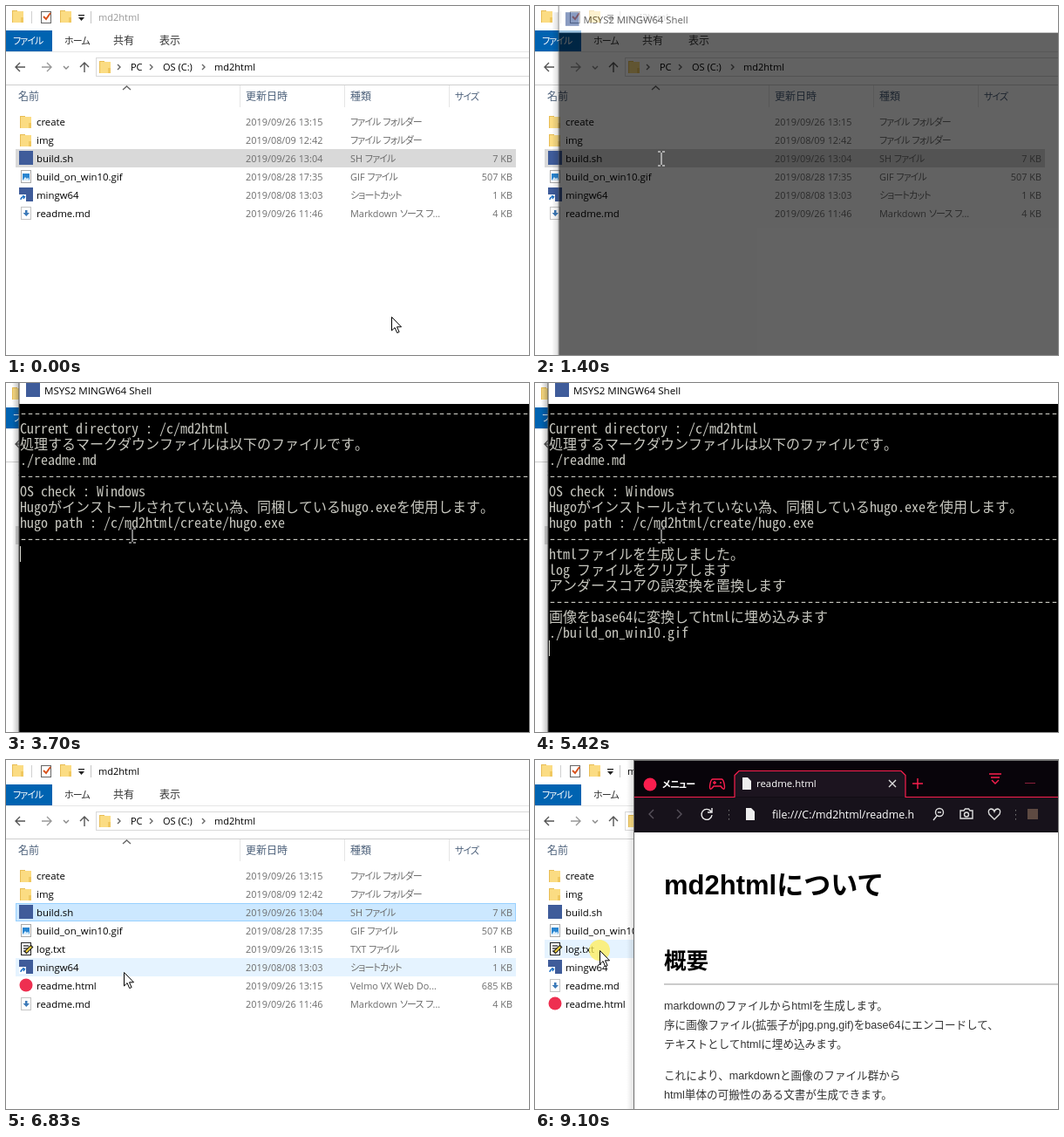
Recreate the animation shown at these times as an HTML page. Size 600x400 px, loop 9170 ms.

```html
<!DOCTYPE html>
<html lang="ja">
<head>
<meta charset="utf-8">
<title>md2html</title>
<style>
html, body { margin: 0; width: 100%; height: 100%; overflow: hidden; background: #fff; }
svg { display: block; width: 600px; height: 400px; }
text { font: 11.4px "Open Sans", "Noto Sans CJK JP", "Noto Sans CJK", sans-serif; white-space: pre; }
.k { font-size: 11px; font-feature-settings: "palt"; letter-spacing: -.9px; }
.nav { font-size: 11px; }
.dim { fill: #6d6d6d; font-size: 10.9px; }
.head { fill: #4c607a; font-size: 12px; }
.menu { fill: #333; font-size: 12px; }
.term text { font: 16px "Noto Sans Mono CJK JP", "Noto Sans Mono", "Noto Sans CJK JP", monospace; fill: #c6c6be; }
.lite { fill: #fff; }
.strong { fill: #fff; font-weight: 600; }
.hint { fill: #e2dee2; font-size: 12px; font-feature-settings: "palt"; }
.hint .k { letter-spacing: -.7px; }
.logo { font-size: 20px; font-weight: 700; font-style: italic; fill: #fff; }
.cat { font-size: 12.5px; font-weight: 600; fill: #f2eef0; }
.game { font-size: 11.2px; font-weight: 700; fill: #fff; letter-spacing: -.2px; }
.day { font-size: 23px; font-weight: 700; fill: #fff; }
.doc text { font: 12.6px "Liberation Sans", "Noto Sans CJK JP", "Noto Sans CJK", sans-serif; fill: #333; }
.doc .k { font: inherit; letter-spacing: 0; font-feature-settings: normal; }
.doc .h1 { font-size: 31px; font-weight: 700; fill: #000; }
.doc .h2 { font-size: 25.5px; font-weight: 700; fill: #000; }
.line { fill: none; stroke-width: 1.4; }
</style>
</head>
<body>
<svg id="stage" viewBox="0 0 600 400"></svg>
<script>
const LOOP = 9170, RED = '#fa1e4e';

// ---- drawing helpers ----
const text = (x, y, s, cls = '', more = '') =>
  `<text x="${x}" y="${y}" class="${cls}" ${more}>${s.replace(/[ァ-ヶー]+/g, '<tspan class="k">$&</tspan>')}</text>`;
const rect = (x, y, w, h, fill, more = '') =>
  `<rect x="${x}" y="${y}" width="${w}" height="${h}" fill="${fill}" ${more}/>`;
const line = (d, color, more = '') => `<path class="line" d="${d}" stroke="${color}" ${more}/>`;
const disc = (x, y, r, fill, more = '') => `<circle cx="${x}" cy="${y}" r="${r}" fill="${fill}" ${more}/>`;
const group = (id, body, more = '') => `<g id="${id}" ${more}>${body}</g>`;
const at = (x, y, body) => `<g transform="translate(${x} ${y})">${body}</g>`;
const dots = (x, color) => [57, 62, 67].map(y => rect(x, y, 1, 1.5, color)).join('');

const page = (edge = '#a9a9a9') => rect(1.5, .5, 11, 14, '#fff', `stroke="${edge}"`);
const icons = {
  folder: rect(0, 1, 6, 14, '#e8bd55') + rect(1, 2, 12, 13, '#fbdc83') + rect(10, 9, 3, 6, '#f0c860'),
  shell: rect(-1, -1, 16, 16, '#3f5c9a'),
  link: rect(-1, -1, 16, 16, '#3f5c9a') + rect(-1, 7, 8, 8, '#fff') + line('M1 13q0-3 4-3.500M3 8.500l2.500 1-1.500 2.500', '#1c6fc4'),
  image: page() + rect(3, 4, 8, 8, '#2a86d1') + '<path d="M3 12l3-4 2 2 1.500-1.500L11 12z" fill="#d6ecfb"/>',
  log: page('#222') + line('M4 4h6M4 7h6M4 10h4', '#444') + line('M6 12L14 4', '#222', 'style="stroke-width:4"') + line('M7 11l6-6', '#f3cf3a', 'style="stroke-width:2.200"'),
  html: disc(7, 7, 7.5, '#ee2f50'),
  md: page('#c4c4c4') + '<path d="M6 4h2.500v3h2.500l-3.700 4-3.700-4H6z" fill="#3b79b8"/>'
};
const icon = (name, x, y) => at(x, y, icons[name]);

// ---- file manager ----
const rowTop = i => 122 + 21 * i;
const dir = 'ファイル フォルダー', day = '2019/09/26 ';
const files = {
  create: ['folder', day + '13:15', dir, ''],
  img: ['folder', '2019/08/09 12:42', dir, ''],
  'build.sh': ['shell', day + '13:04', 'SH ファイル', '7 KB'],
  'build_on_win10.gif': ['image', '2019/08/28 17:35', 'GIF ファイル', '507 KB'],
  'log.txt': ['log', day + '13:15', 'TXT ファイル', '1 KB'],
  mingw64: ['link', '2019/08/08 13:03', 'ショートカット', '1 KB'],
  'readme.html': ['html', day + '13:15', 'Velmo VX Web Do...', '685 KB'],
  'readme.md': ['md', day + '11:46', 'Markdown ソース フ...', '4 KB']
};
const names = Object.keys(files);
const list = (id, order) => group(id, order.map((name, i) => {
  const [pic, date, type, size] = files[name], y = rowTop(i) + 15;
  return icon(pic, 16, rowTop(i) + 3) + text(35, y, name) + text(275, y, date, 'dim') +
    text(395, y, type, 'dim') + text(581, y, size, 'dim', 'text-anchor="end"');
}).join(''));

const chevron = (x, y) => line(`M${x - 2} ${y - 3}l3 3-3 3`, '#666');
const arrow = (x, color) => line(`M${x + 12} 70H${x + 1}M${x + 6} 65l-5 5 5 5`, color);

const explorer = rect(0, 0, 600, 400, '#fff') +
  icon('folder', 7, 4) + rect(29, 6, 1, 14, '#d0d0d0') +
  rect(40.5, 6.5, 11, 13, '#fff', 'stroke="#666"') + line('M43 12l3 3 5-7', '#d9531e', 'style="stroke-width:2"') +
  icon('folder', 62, 4) + rect(83, 10, 7, 1.3, '#222') + '<path d="M83 13h7l-3.500 4z" fill="#222"/>' +
  rect(97, 6, 1, 14, '#c4c4c4') + text(106, 17, 'md2html', 'nav', 'id="caption"') +
  rect(0, 28, 53, 24, '#0063b1') + text(8, 44, 'ファイル', 'lite') +
  text(67, 44, 'ホーム', 'menu') + text(123, 44, '共有', 'menu') + text(176, 44, '表示', 'menu') +
  rect(0, 52, 600, 1, '#e6e6e6') +
  arrow(10, '#555') + `<g transform="matrix(-1 0 0 1 93 0)">${arrow(40, '#999')}</g>` +
  line('M66 69l3 3 3-3', '#888') + line('M90 76V65M85 70l5-5 5 5', '#555') +
  rect(103.5, 59.5, 520, 21, '#fff', 'stroke="#d9d9d9"') + icon('folder', 107, 62) +
  chevron(130, 70) + text(143, 74, 'PC', 'nav') + chevron(167, 70) + text(180, 74, 'OS (C:)', 'nav') +
  chevron(227, 70) + text(239, 74, 'md2html', 'nav') +
  rect(0, 90, 600, 1, '#cfcfcf') + line('M134 96l4.500-4 4.500 4', '#666') +
  [268, 388, 508].map(x => rect(x, 91, 1, 25, '#e5e5e5')).join('') +
  text(14, 108, '名前', 'head') + text(275, 108, '更新日時', 'head') + text(395, 108, '種類', 'head') + text(515, 108, 'サイズ', 'head') +
  '<rect id="hover" x="11" width="574" height="21" fill="#e5f3ff"/>' +
  '<rect id="pick" x="11.500" width="573" height="20"/>' +
  list('before', names.filter(n => !/log|html/.test(n))) +
  list('after', names) +
  list('sorted', [...names.slice(0, 6), 'readme.md', 'readme.html']);

// ---- terminal ----
const rule = '-'.repeat(80);
const output = [
  rule, 'Current directory : /c/md2html', '処理するマークダウンファイルは以下のファイルです。', './readme.md',
  rule, 'OS check : Windows', 'Hugoがインストールされていない為、同梱しているhugo.exeを使用します。',
  'hugo path : /c/md2html/create/hugo.exe',
  rule, 'htmlファイルを生成しました。', 'log ファイルをクリアします', 'アンダースコアの誤変換を置換します',
  rule, '画像をbase64に変換してhtmlに埋め込みます', './build_on_win10.gif',
  rule, 'マークダウンからhtmlファイルの生成処理が完了しました。', '終了します。'
];
// Half-width glyphs take one 8px cell, full-width glyphs two.
const cells = s => {
  let x = 16;
  return [...s].map(c => { const here = x; x += c > 'ÿ' ? 16 : 8; return here; }).join(' ');
};
const terminal = rect(7, 0, 8, 600, 'url(#shade)') +
  rect(15, -30, 900, 630, '#000') + rect(15, -30, 900, 54, '#fff') + rect(14.5, -30, 1, 630, '#555') +
  rect(23, 0, 16, 16, '#3f5c9a') + text(44, 13, 'MSYS2 MINGW64 Shell', '', 'id="title" style="font-size:11.6px"') +
  group('screen', output.map((s, i) => `<text x="${cells(s)}" y="${40 + 18 * i}">${s}</text>`).join(''), 'class="term"') +
  '<rect id="caret" x="16" width="1" height="18" fill="#d8d8d0"/>';

// ---- browser ----
const pad = line('M204 22h10q2 0 3 5t0 6q-1 1-4-3h-8q-3 4-4 3t0-6 3-5z', RED) +
  line('M204 26h4M206 24v4M212 26h2', RED);
const plus = x => line(`M${x - 6} 27h12M${x} 21v12`, RED);
const camera = x => line(`M${x - 7} 58h4l1.500-2h4l1.500 2h3v9h-14z`, '#ddd') + `<circle class="line" cx="${x}" cy="62.500" r="2.500" stroke="#ddd"/>`;
const sheet = (x, y) => `<path d="M${x - 5} ${y - 7}h6l4 4v10h-10z" fill="#eee"/>`;
// Tab outline that runs along the whole bar.
const tab = (left, width, fill) => line(
  `M114 42.500H${left}V17.500l5-5h${width - 10}l5 5v25H600`, RED, `style="fill:${fill};stroke-width:1.200"`);
const chrome = rect(105, 0, 9, 400, 'url(#shade)', 'id="glow"') +
  rect(113, 0, 487, 400, '#707070') + rect(114, 1, 486, 42, '#08040a') + rect(114, 43, 486, 40, '#17121b') +
  disc(132, 28, 7.5, RED) + text(146, 32, 'メニュー', 'strong') +
  line('M521 16h14M523 20h10M524 23l4 4 4-4', RED) + rect(562, 26, 12, 1, '#8a1f3a') +
  line('M136 57l-5 5 5 5M163 57l5 5-5 5', '#57515b') +
  line('M202 59a6 6 0 1 0 1 4M203 55v5h-5', '#eee') + dots(222, '#777') + dots(551, '#777') +
  rect(565, 56, 12, 12, '#5e4a42');

const card = (x, stroke, fill) =>
  `<path d="M${x}.500 269.500l10-10h87q4 0 4 4v124l-10 10h-87q-4 0-4-4z" fill="${fill}" stroke="${stroke}"/>`;
const game = (x, lines, date) => card(x, '#e8e0e3', '#ffffff0c') +
  lines.map((s, i) => text(x + 8, 291 + 16 * i, s, 'game')).join('') +
  text(x + 8, 357, '9', 'strong') + rect(x + 23, 343, 1, 17, '#fff') + text(x + 32, 361, date, 'day') +
  [0, 1, 2, 3].map(i => disc(x + 15 + 18 * i, 381, 7, '#b9b1b4')).join('');
const sparks = [[170, 180, 3], [238, 298, 5], [320, 324, 3], [470, 262, 5], [388, 214, 2], [300, 207, 2], [516, 327, 4], [440, 235, 2]]
  .map(([x, y, r]) => `<path d="M${x - r} ${y + r / 2}l${r}-${r} ${r} ${r * .8}z" fill="#c8163c"/>`).join('');
const cats = [[235, 'ALL'], [268, 'VK'], [294, 'KUBO'], [338, 'FLIPON'], [396, 'DESKTOP'], [471, 'LUM'], [511, 'PENTO']];

const start = rect(114, 83, 486, 317, 'url(#dusk)') + rect(114, 83, 486, 317, 'url(#ember)') +
  line('M160 314l55-9M419 165l15-8M455 312l18-6', '#5a1022') + sparks +
  tab(190, 38, '#1d0b16') + pad + plus(241) +
  disc(247, 62, 6.5, RED) + text(272, 66, '検索キーワードあるいはウェブアドレスを入力', 'hint') + camera(526) +
  text(236, 132, 'VX Alcove', 'logo') + rect(344, 114, 74, 21, '#ff1e50', 'rx="2"') +
  text(348, 129, 'フィードバック', 'lite', 'style="font-weight:700"') +
  cats.map(([x, s]) => text(x, 183, s, 'cat')).join('') + rect(396, 187, 66, 2, RED) +
  '<circle class="line" cx="522" cy="179" r="5" stroke="#ddd" stroke-dasharray="2 2"/>' +
  text(235, 238, 'RELEASE CALENDAR', 'lite', 'style="font-size:13.2px;font-weight:700"') +
  card(236, RED, '#fa1e4e26') + text(243, 355, '9', '', `style="font-size:26px;font-weight:600;fill:${RED}"`) +
  text(243, 376, '2019', '', 'style="font-size:12px;fill:#c4183e"') +
  game(355, ['Distant Reverie', 'Rekindled'], '03') +
  `<g clip-path="url(#shelf)">${game(474, ['Amber Town G'], '05')}</g>` +
  line('M558 325l9 9-9 9', '#c9c2c5', 'style="stroke-width:3"');

const paper = [[286, 'markdownのファイルからhtmlを生成します。'],
  [308, '序に画像ファイル(拡張子がjpg,png,gif)をbase64にエンコードして、'],
  [330, 'テキストとしてhtmlに埋め込みます。'],
  [366, 'これにより、markdownと画像のファイル群から'],
  [388, 'html単体の可搬性のある文書が生成できます。']];
const reader = tab(229, 196, '#1c141f') + pad + plus(439) +
  sheet(243, 27) + text(254, 31, 'readme.html', 'lite') + line('M406 23l8 8M414 23l-8 8', '#ddd') +
  sheet(247, 62) + `<g clip-path="url(#address)">${text(272, 67, 'file:///C:/md2html/readme.html', 'lite', 'style="font-size:12.4px"')}</g>` +
  '<circle class="line" cx="464" cy="60" r="4.500" stroke="#ddd"/>' + line('M461 64l-4 5M462 60h4', '#ddd') + camera(495) +
  line('M527 68l-6-6q-2-5 2-6 3 0 4 3 1-3 4-3 4 1 2 6z', '#ddd') +
  rect(114, 83, 486, 317, '#fff') +
  group('body', text(148, 154, 'md2htmlについて', 'h1') + text(148, 239, '概要', 'h2') + rect(148, 256, 452, 2, '#cbcbcb') +
    paper.map(([y, s]) => text(148, y, s)).join(''), 'class="doc"');

// ---- pointer ----
const pointer = group('mark', disc(0, 0, 12, '#ffee58', 'opacity=".75"')) +
  group('ring', '<circle cx="17" cy="7" r="4" fill="none" stroke="#2f8fd8" stroke-width="2"/>') +
  group('arrow', '<path d="M.500.500V16l3.600-3.400 2.600 6 2.400-1-2.600-5.800H11.500z" fill="#fff" stroke="#000"/>') +
  group('beam', line('M-1-8h3M4-8h3M3-7V7M-1 8h3M4 8h3', '#fff', 'style="stroke-width:1"'));

stage.innerHTML = `<defs>
  <linearGradient id="shade"><stop offset="0" stop-opacity="0"/><stop offset="1" stop-opacity=".25"/></linearGradient>
  <linearGradient id="dusk" x2="0" y2="1"><stop offset="0" stop-color="#080104"/><stop offset=".4" stop-color="#110207"/><stop offset="1" stop-color="#2e0410"/></linearGradient>
  <radialGradient id="ember" cx=".3" cy=".75" r=".4"><stop offset="0" stop-color="#5a0a20" stop-opacity=".5"/><stop offset="1" stop-color="#2e0410" stop-opacity="0"/></radialGradient>
  <clipPath id="shelf">${rect(470, 255, 65, 145, '#000')}</clipPath>
  <clipPath id="address">${rect(268, 50, 167, 26, '#000')}</clipPath></defs>` +
  explorer + group('term', terminal) +
  group('browser', chrome + group('home', start) + group('reader', reader)) + group('mouse', pointer);

// ---- timeline ----
const $ = Object.fromEntries([...stage.querySelectorAll('[id]')].map(e => [e.id, e]));
const rows = [...$.screen.children];
const moves = [
  [[70, 150, 230, 310, 380, 460], 142, 174],
  [[6680, 6760, 6830, 6910], 134, 255],
  [[8700, 8780, 8870], 74, 218]
];
const printed = [[0, 0], [2860, 1], [2940, 2], [3240, 4], [3320, 5], [3480, 6], [3630, 8], [3700, 9], [4100, 10],
  [4180, 11], [4330, 12], [4790, 13], [4870, 14], [5420, 15], [5720, 18]];
// time, opacity, scale
const fades = [[0, 0, 1], [1310, .25, .955], [1400, .61, .976], [1470, .86, .99], [1550, .98, .998], [1630, 1, 1],
  [5880, .66, .985], [5960, .3, .965], [6050, .08, .95], [6130, 0, 1]];
const latest = (keys, t) => keys.findLast(k => k[0] <= t);
const within = (t, ...spans) => spans.some(([a, b]) => t >= a && t < b);
const show = (el, on) => el.style.display = on ? '' : 'none';
const ease = f => (1 - Math.cos(Math.PI * f)) / 2;

function pointerAt(t) {
  let x = 442, y = 356;
  for (const [times, tx, ty] of moves) {
    const f = ease(times.filter(s => s <= t).length / times.length);
    x += (tx - x) * f;
    y += (ty - y) * f;
  }
  return [Math.round(x), Math.round(y)];
}

function render(t) {
  const [x, y] = pointerAt(t);
  const inTerm = within(t, [1310, 5880]);
  const focus = within(t, [690, 1310], [5880, 7680], [9100, LOOP]);
  const row = Math.floor((y - rowTop(0)) / 21);
  const picked = t < 7140 ? 2 : t < 7450 ? 6 : -1;
  const over = !inTerm && row >= 0 && row < (t < 3000 ? 6 : 8) && x < 585;

  $.caption.setAttribute('fill', focus ? '#000' : '#999');
  show($.hover, over && row !== picked);
  $.hover.setAttribute('y', rowTop(row));
  const blue = focus || over && row === picked;
  show($.pick, picked >= 0);
  $.pick.setAttribute('y', rowTop(picked) + .5);
  $.pick.setAttribute('fill', blue ? '#cce8ff' : '#d9d9d9');
  $.pick.setAttribute('stroke', blue ? '#99d1ff' : '#d9d9d9');
  show($.before, t < 3000);
  show($.after, within(t, [3000, 7450]));
  show($.sorted, t >= 7450);

  const [, alpha, scale] = latest(fades, t);
  show($.term, alpha > 0);
  $.term.setAttribute('opacity', alpha);
  $.term.setAttribute('transform', `translate(520 300) scale(${scale}) translate(-520 -300)`);
  $.title.setAttribute('fill', t < 5880 ? '#000' : '#ccc');
  const count = latest(printed, t)[1];
  rows.forEach((r, i) => show(r, i < count));
  show($.caret, within(t, [1550, 1860], [2400, 5880]));
  $.caret.setAttribute('y', 25 + 18 * count);

  show($.browser, t >= 7600);
  show($.home, t < 7680);
  show($.reader, t >= 7680);
  show($.body, t >= 7760);
  $.glow.setAttribute('opacity', t < 9100 ? 1 : .5);

  $.mouse.setAttribute('transform', `translate(${x} ${inTerm ? y + 1 : y})`);
  show($.arrow, !inTerm);
  show($.beam, inTerm);
  show($.ring, within(t, [920, 1310]));
  show($.mark, within(t, [690, 770], [840, 920], [7140, 7290], [7370, 7450], [9100, LOOP]));
}

function tick() {
  render(performance.now() % LOOP);
  requestAnimationFrame(tick);
}
tick();
</script>
</body>
</html>
```
